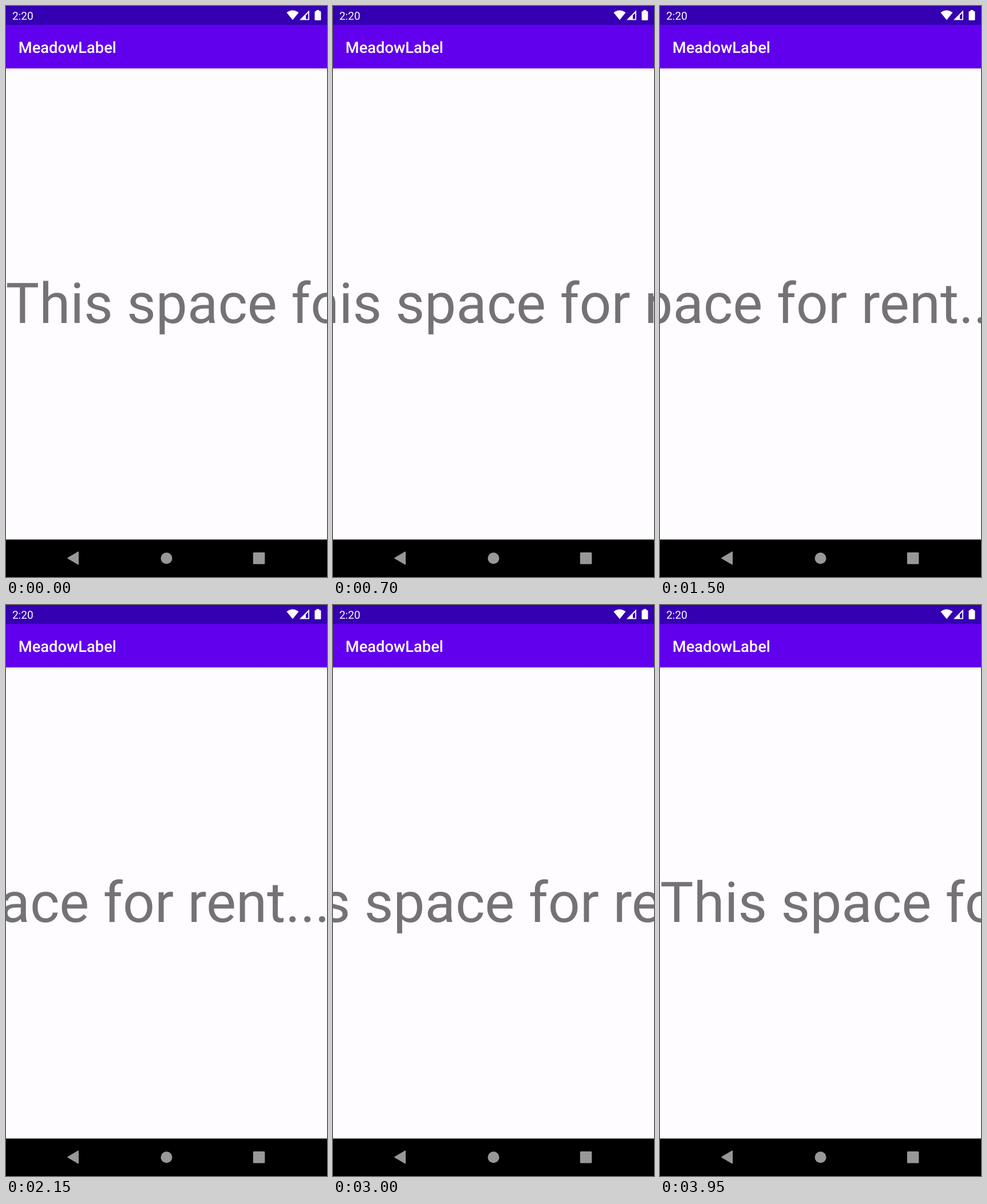
These frames come from a looping animation (561 by 998 pixels, 4000 ms). An HTML page:

```html
<!DOCTYPE html>
<html lang="en">
<head>
<meta charset="utf-8">
<title>Scrolling text</title>
<style>
  html, body { margin: 0; width: 100%; height: 100%; overflow: hidden; background: #fefcff; }
  svg { display: block; font-family: Roboto, sans-serif; }
  text { text-rendering: geometricPrecision; }
</style>
</head>
<body>
<svg width="561" height="998" viewBox="0 0 561 998">
  <defs>
    <linearGradient id="shadow" x2="0" y2="1">
      <stop stop-opacity=".13"/>
      <stop offset=".4" stop-opacity=".04"/>
      <stop offset="1" stop-opacity="0"/>
    </linearGradient>
  </defs>
  <rect width="561" height="998" fill="#fefcff"/>
  <text id="marquee" y="554" font-size="98.2" fill="#747276">This space for rent...</text>

  <rect y="109" width="561" height="6" fill="url(#shadow)"/>
  <rect y="32" width="561" height="77" fill="#6100ed"/>
  <rect width="561" height="33" fill="#3500b1"/>

  <g fill="#fff">
    <text x="10.9" y="24" font-size="19.09">2:20</text>
    <text x="21.8" y="81.5" font-size="27.27" font-weight="500">MeadowLabel</text>
    <path d="M490.5 11.5Q501 3.5 511.5 11.5L501 24.5Z"/>
    <path fill-rule="evenodd" d="M513 24.5L530 7.5V24.5ZM524 16.5V22.7H528.2V12.2Z"/>
    <path d="M542.5 7H547.5V9H549Q550.5 9 550.5 10.5V23.5Q550.5 25 549 25H541Q539.5 25 539.5 23.5V10.5Q539.5 9 541 9H542.5Z"/>
  </g>

  <rect y="932.5" width="561" height="65.5"/>
  <g fill="#999799">
    <path d="M108 965L126.3 954.2V975.8Z" stroke="#999799" stroke-width="1.5" stroke-linejoin="round"/>
    <circle cx="280.5" cy="965.3" r="10"/>
    <rect x="431.8" y="955" width="20.6" height="20.6" rx="1.5"/>
  </g>
</svg>
<script>
  const marquee = document.getElementById("marquee");
  const LOOP = 4000, STEP = 50, LEAD = 43, TRAVEL = 336.5;
  const start = performance.now();

  // Cosine ease out to the end of the text and back, in 50 ms steps.
  function draw() {
    const elapsed = Math.max(0, performance.now() - start) % LOOP;
    const t = Math.floor(elapsed / STEP) * STEP + LEAD;
    const eased = (1 - Math.cos(2 * Math.PI * t / LOOP)) / 2;
    marquee.setAttribute("transform", `translate(${(-TRAVEL * eased).toFixed(2)} 0)`);
    requestAnimationFrame(draw);
  }
  draw();
</script>
</body>
</html>
```
